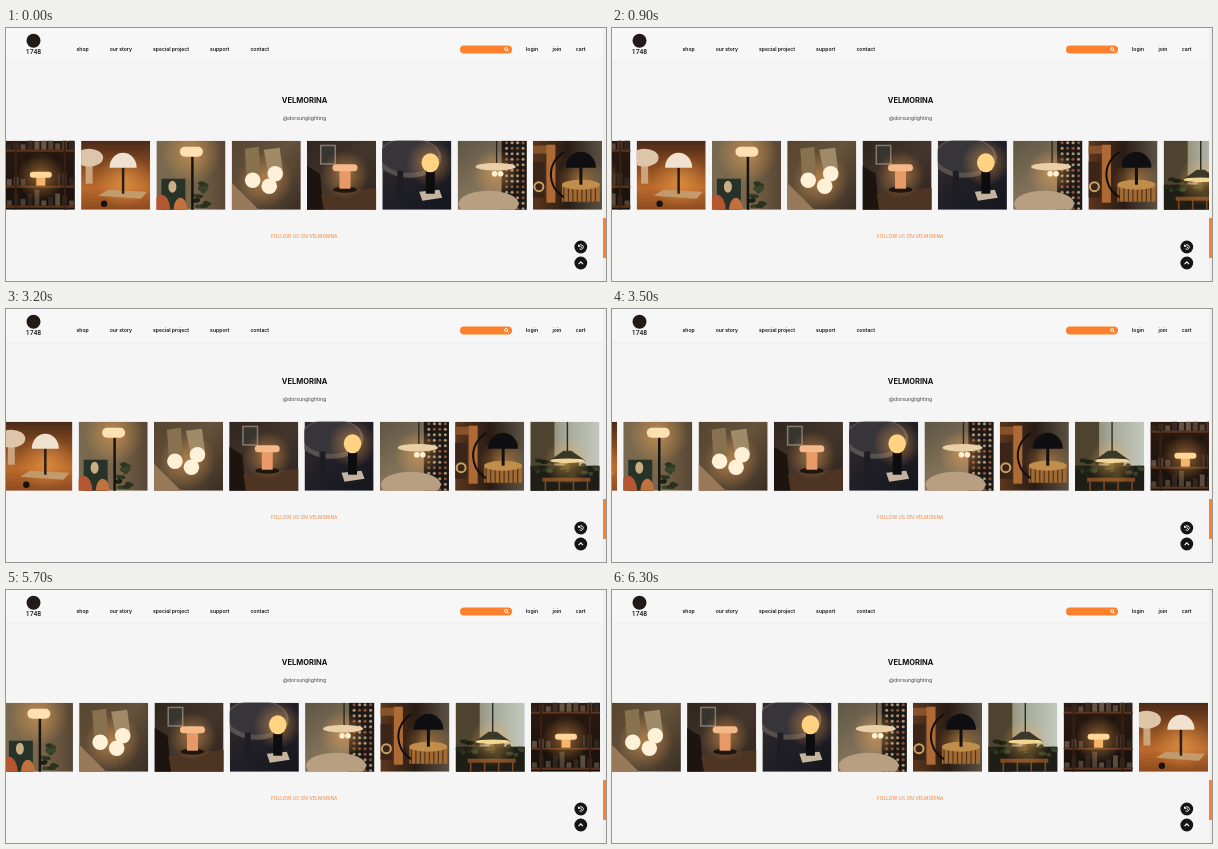
An HTML page with a canvas for the animation above (8000 ms loop, 600 by 253 pixels).

```html
<!DOCTYPE html>
<html lang="en">
<head>
<meta charset="utf-8">
<title>Lamp shop</title>
<style>
html, body { margin: 0; width: 600px; height: 253px; overflow: hidden; background: #f6f5f6; }
canvas { display: block; width: 600px; height: 253px; }
</style>
</head>
<body>
<canvas id="stage"></canvas>
<script>
const canvas = document.getElementById('stage');
const g = canvas.getContext('2d');
const scale = window.devicePixelRatio || 1;
canvas.width = 600 * scale;
canvas.height = 253 * scale;

const LOOP = 8000, TICK = 100;
const SLIDE = 600, EVERY = 2505, FIRST = 665;
const PITCH = 75.3, CARD = 69.1, TOP = 112.7;
const PAGE = '#f6f5f6', ORANGE = '#fd812d', INK = '#161616';

let seed = 1;
function rnd() {
  seed = seed * 16807 % 2147483647;
  return seed / 2147483647;
}

// Shapes
function box(c, x, y, w, h) { g.fillStyle = c; g.fillRect(x, y, w, h); }
function oval(c, x, y, rx, ry = rx, from = 0) {
  g.fillStyle = c;
  g.beginPath();
  g.ellipse(x, y, rx, ry, 0, from, Math.PI * 2);
  g.fill();
}
function dome(c, x, y, rx, ry) { oval(c, x, y, rx, ry, Math.PI); }
function poly(c, ...p) {
  g.fillStyle = c;
  g.beginPath();
  for (let i = 0; i < p.length; i += 2) g.lineTo(p[i], p[i + 1]);
  g.fill();
}
function line(c, w, ...p) {
  g.strokeStyle = c;
  g.lineWidth = w;
  g.beginPath();
  for (let i = 0; i < p.length; i += 2) g.lineTo(p[i], p[i + 1]);
  g.stroke();
}
function ring(c, w, x, y, r, from = 0, to = Math.PI * 2) {
  g.strokeStyle = c;
  g.lineWidth = w;
  g.beginPath();
  g.arc(x, y, r, from, to);
  g.stroke();
}
function pill(c, x, y, w, h) {
  g.fillStyle = c;
  g.beginPath();
  g.roundRect(x, y, w, h, h / 2);
  g.fill();
}
function stem(c, x, top, foot, w) { box(c, x - w / 2, top, w, foot - top); }
function fade(x, y, ...stops) {
  const f = g.createLinearGradient(0, 0, x, y);
  stops.forEach((c, i) => f.addColorStop(i / (stops.length - 1), c));
  return f;
}
function wall(x, y, ...stops) { box(fade(x, y, ...stops), 0, 0, CARD, CARD); }
function glow(x, y, r = 24) {
  const f = g.createRadialGradient(x, y, 0, x, y, r);
  f.addColorStop(0, 'rgba(255,175,85,.5)');
  f.addColorStop(1, 'rgba(255,175,85,0)');
  oval(f, x, y, r);
}

// Things that stand or hang in the photos
function jars(foot, n) {
  const step = CARD / n;
  for (let i = 0; i < n; i++) {
    const h = 5 + rnd() * 11;
    box(`hsl(28 20% ${12 + rnd() * 22}%)`, i * step + 1, foot - h, step - 2, h);
  }
}
function leaves(n, x, y, w, h) {
  for (let i = 0; i < n; i++)
    oval(`hsl(85 25% ${9 + rnd() * 14}%)`, x + rnd() * w, y + rnd() * h, 2 + rnd() * 3, 2);
}
function dots(x0, step) {
  for (let x = x0; x < CARD; x += step)
    for (let y = 2; y < CARD; y += step)
      oval(rnd() < .5 ? '#8c5138' : '#a8957a', x, y, step / 3.6);
}

function shelves() {
  wall(0, 70, '#2c1a11', '#17100d');
  for (const foot of [9, 45, 65]) {
    jars(foot, 10);
    box('#5f361b', 0, foot, 70, 2);
  }
  box('#1f130d', 20, 15, 32, 30);
  glow(35, 36);
  stem('#3b2114', 10, 0, 70, 2);
  stem('#3b2114', 59, 0, 70, 2);
  stem('#f7b46c', 35, 34, 45, 9);
  pill('#ffd698', 24, 31, 22, 6);
}
function twoDomes() {
  wall(0, 70, '#4a2a19', '#84491f', '#bb6a2b', '#8c491f');
  glow(43, 40, 28);
  stem('#c9a47c', 8, 20, 43, 7);
  oval('#dcc5a8', 8, 17, 14, 9);
  poly('#c39a6b', 27, 49, 66, 51, 60, 58, 17, 55);
  stem('#2c1d15', 42, 26, 53, 2.5);
  dome('#f0e2ce', 42, 27, 13.5, 15);
  oval('#17110f', 23, 63, 3.2);
}
function floorLamp() {
  wall(70, 0, '#79694f', '#7a674b', '#564533');
  glow(35, 13, 30);
  box('#273329', 5, 38, 24, 32);
  oval('#c9ae84', 16, 46, 4, 6);
  dome('#b4562f', 5, 70, 9, 16);
  dome('#bf713e', 24, 70, 7, 13);
  leaves(16, 34, 40, 18, 28);
  stem('#171412', 36, 15, 70, 2.5);
  pill('#ffe0b2', 23.5, 6, 23, 10);
}
function globes() {
  wall(70, 60, '#55442f', '#66523b', '#3d3126');
  poly('#98795a', 0, 42, 28, 70, 0, 70);
  glow(34, 39, 28);
  poly('#87714f', 13, 8, 27, 6, 29, 34, 15, 36);
  poly('#a18a67', 32, 9, 48, 7, 51, 30, 37, 34);
  for (const [x, y] of [[21, 39.5], [43.5, 33], [37.5, 45.5]]) oval('#fff1d8', x, y, 7.8);
}
function mushroom() {
  wall(70, 70, '#30251f', '#44362c', '#2c211b');
  box('#827a6c', 13, 4, 16, 20);
  box('#383531', 14.5, 5.5, 13, 17);
  poly('#1d1410', 0, 25, 13, 33, 17, 70, 0, 70);
  poly('#4d3423', 14, 53, 70, 47, 70, 70, 17, 70);
  glow(38, 34);
  oval('#1d1512', 38, 49, 12, 3);
  stem('#e79a68', 38, 28, 48, 11);
  pill('#f5b989', 25.5, 23.5, 25, 7);
}
function bulb() {
  wall(70, 70, '#342c2b', '#201f27', '#15161d');
  oval('#57504e', 27, 17, 32, 20);
  oval('#38353a', 27, 15, 29, 17);
  stem('#1d1d23', 18, 30, 62, 6);
  glow(48, 22);
  poly('#c5b5a0', 37, 51, 57, 49, 60, 57, 40, 60);
  stem('#0d0c0e', 48, 28, 53, 9);
  oval('#ffd382', 48, 22, 8.8, 9.5);
}
function disc() {
  wall(50, 70, '#5d5543', '#7d6e57', '#9d8469');
  box('#1c1816', 44, 0, 26, 70);
  dots(49, 5.5);
  glow(38, 32);
  oval('#b99f82', 31, 63, 30, 13);
  stem('#29241f', 39, 0, 24, 1.3);
  oval('#e9d0a9', 38, 26, 20, 3.8);
  for (const x of [37, 43]) oval('#fff1d1', x, 33, 2.8);
}
function blackDome() {
  wall(70, 0, '#5c361d', '#291c15', '#5c5344');
  box('#87512a', 0, 5, 22, 8);
  stem('#ad6a35', 18, 4, 62, 9);
  box('#3b2518', 0, 21, 12, 36);
  ring('#c9a061', 2, 6, 46, 4.5);
  glow(48, 40);
  box('#a16b34', 29, 44, 38, 17);
  for (let x = 31; x < 66; x += 4.5) stem('#553319', x, 47, 61, 1.2);
  oval('#c08d4b', 48, 44, 19, 5);
  ring('#120e0d', 2, 44, 34, 26, 2.1, 4.2);
  stem('#131110', 48, 25, 44, 3);
  dome('#0f0f11', 48, 27, 15, 16);
}
function pendant() {
  wall(70, 0, '#75664c', '#a5a896', '#c4c9c0');
  box('#4d432f', 0, 0, 24, 70);
  box('#1f1e16', 0, 44, 70, 26);
  leaves(30, 2, 36, 66, 18);
  box('#7d4a24', 12, 56, 48, 4);
  for (let x = 15; x < 62; x += 14) stem('#7d4a24', x, 58, 70, 1.5);
  glow(37, 40);
  stem('#282b23', 37, 0, 31, 1.4);
  poly('#3a3829', 33, 29, 41, 29, 55, 39, 19, 39);
  oval('#f4d694', 37, 39, 17, 2.3);
}
const PHOTOS = [shelves, twoDomes, floorLamp, globes, mushroom, bulb, disc, blackDome, pendant];

// Standard "ease" curve, solved by bisection
function ease(x) {
  if (x <= 0) return 0;
  if (x >= 1) return 1;
  const curve = (u, a, b) => 3 * u * (1 - u) ** 2 * a + 3 * u * u * (1 - u) * b + u ** 3;
  let lo = 0, hi = 1;
  for (let i = 0; i < 20; i++) {
    const mid = (lo + hi) / 2;
    if (curve(mid, .25, .25) < x) lo = mid; else hi = mid;
  }
  return curve(lo, .1, 1);
}

function carousel(t) {
  let pos = 0;
  for (let s = FIRST; s < t; s += EVERY) pos += ease((t - s) / SLIDE);
  const first = Math.floor(pos);
  for (let i = first; i < first + 9; i++) {
    const n = i % PHOTOS.length;
    seed = 77 + n;
    g.save();
    g.translate((i - pos) * PITCH - .2, TOP);
    g.beginPath();
    g.rect(0, 0, CARD, CARD);
    g.clip();
    PHOTOS[n]();
    g.restore();
  }
}

function write(s, x, y, font, color, align = 'center') {
  g.font = font + ', sans-serif';
  g.fillStyle = color;
  g.textAlign = align;
  g.fillText(s, x, y);
}
function menu(names, x, gap) {
  for (const name of names) {
    write(name, x, 23, '600 5.1px Inter', INK, 'left');
    x += g.measureText(name).width + gap;
  }
}

function header() {
  box(fade(0, 37, '#dededf', '#e6e5e6', PAGE), 0, 32, 597, 5);
  box('#f8f7f8', 0, 0, 597, 32.5);
  oval('#211a16', 27.5, 12.8, 7);
  write('1748', 27.5, 26.4, '500 6.8px Roboto', INK);
  menu(['shop', 'our story', 'special project', 'support', 'contact'], 70.5, 21);
  menu(['login', 'join', 'cart'], 520, 14.4);
  pill(ORANGE, 454, 17.5, 52, 8);
  ring('#fff', .9, 500.1, 21, 1.5);
  line('#fff', 1, 501.2, 22.1, 502.6, 23.5);
}

function buttons() {
  for (const y of [219, 235]) oval('#151515', 574.8, y, 6.4);
  ring('#fff', .9, 575, 219, 2.3, -2.6, 2.3);
  poly('#fff', 572, 216.2, 572, 218.8, 574.5, 218.8);
  line('#fff', .7, 575, 217.7, 575, 219.2, 576, 219.8);
  line('#fff', 1.1, 572.6, 236.1, 574.8, 233.9, 577, 236.1);
}

function draw(t) {
  g.setTransform(scale, 0, 0, scale, 0, 0);
  box(PAGE, 0, 0, 600, 253);
  header();
  write('VELMORINA', 298.6, 75.4, '700 7.5px Inter', '#111');
  write('@dorsunglighting', 298.6, 91.7, '400 5.2px Inter', '#444');
  write('FOLLOW US ON VELMORINA', 298.2, 209.6, '400 4.8px Inter', ORANGE);
  carousel(t);
  box('#f0eff0', 597, 0, 3, 253);
  box(ORANGE, 597, 190, 3, 40);
  buttons();
}

const began = performance.now();
function frame() {
  const t = (performance.now() - began) % LOOP;
  draw(Math.floor(t / TICK) * TICK);
  requestAnimationFrame(frame);
}
frame();
</script>
</body>
</html>
```
